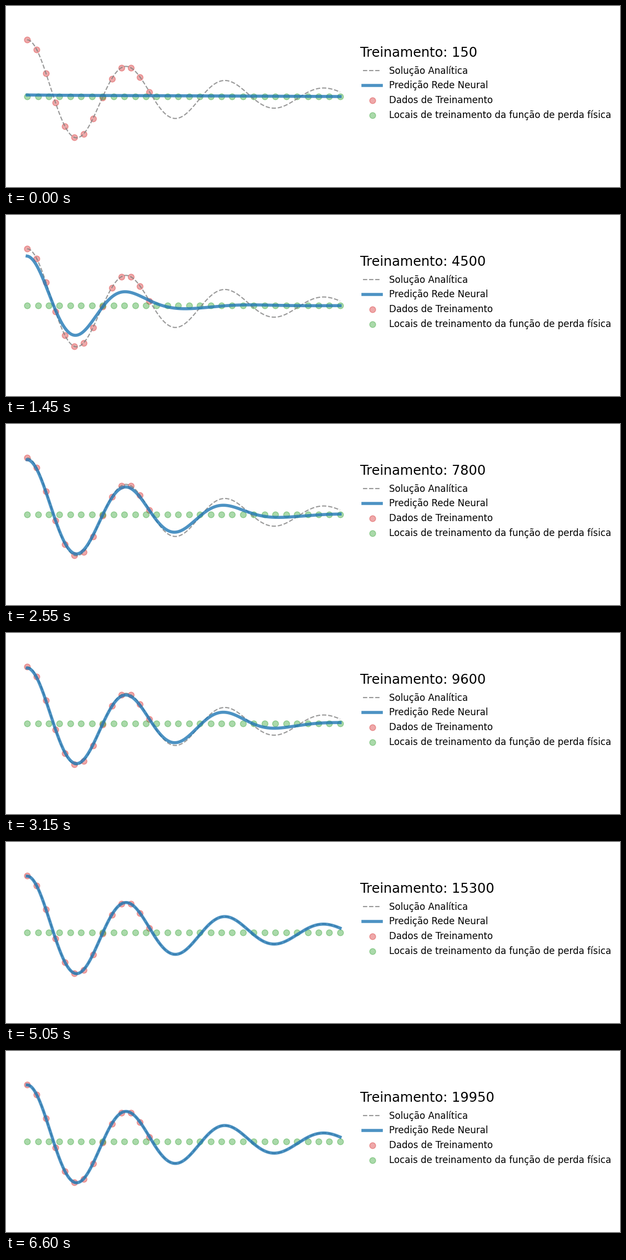
These frames come from a looping animation (1106 px wide and 328 px high, 6650 ms). A matplotlib script:

```python
import numpy as np
import matplotlib.pyplot as plt
from matplotlib.animation import FuncAnimation

W, H, DPI = 1106, 328, 100
FRAMES, INTERVAL, STEP = 133, 50, 150
DAMP, OMEGA0 = 2, 20

plt.rcParams["font.family"] = "DejaVu Sans"


def oscillator(x, lag=0.0):
    """Damped cosine; lag delays the phase but not the decay."""
    w = np.sqrt(OMEGA0**2 - DAMP**2)
    phi = np.arctan(-DAMP / w)
    return np.exp(-DAMP * x) * np.cos(phi + w * (x - lag)) / np.cos(phi)


x = np.linspace(0, 1, 500)
exact = oscillator(x)

# Shapes of the untrained network: nearly flat, then a faint ripple
flat = .025 * (1 - x)
ripple = .056 * np.exp(-x / .11) + .014 * np.cos(2 * np.pi * (x - .62) / .75)


def prediction(step):
    # The learnt region bursts in from the left, creeps on, then races off
    t = (step - 6000) / 1000
    front = .615 + .0385 * t + (t / 10.2)**6 - .012 * np.exp(-2 * t)
    unlearnt = 1 / (1 + np.exp((front - x) / .135))
    peak = 1 - .04 * np.exp(-t / 4.5)
    wave = peak * (1 - unlearnt) * oscillator(x, .13 * unlearnt**4)

    early = max(0, 1 - step / 3000)
    faint = np.interp(step, [0, 3000, 4800], [0, 1, 0])
    return early * flat + faint * ripple + wave


fig = plt.figure(figsize=(W / DPI, H / DPI), dpi=DPI, facecolor="white")
ax = fig.add_axes([10 / W, 10 / H, 620 / W, 308 / H])
ax.set_xlim(-.05, 1.05)
ax.set_ylim(-1.5, 1.5)
ax.axis("off")

ax.plot(x, exact, "--", color="grey", lw=1.5, alpha=.8,
        label="Solução Analítica")
line, = ax.plot(x, prediction(STEP), color="tab:blue", lw=4, alpha=.8,
                label="Predição Rede Neural")
ax.scatter(x[0:200:15], exact[0:200:15], s=60, color="tab:red", alpha=.4,
           label="Dados de Treinamento")
ax.scatter(np.linspace(0, 1, 30), np.zeros(30), s=60, color="tab:green",
           alpha=.4, label="Locais de treinamento da função de perda física")
ax.legend(loc=(1.01, .34), frameon=False, fontsize="large")
title = ax.text(1.065, .7, "", fontsize="xx-large", color="k")


def update(i):
    step = (i + 1) * STEP
    line.set_ydata(prediction(step))
    title.set_text(f"Treinamento: {step}")
    return line, title


anim = FuncAnimation(fig, update, frames=FRAMES, interval=INTERVAL,
                     repeat=True, repeat_delay=0)
plt.show()
```
